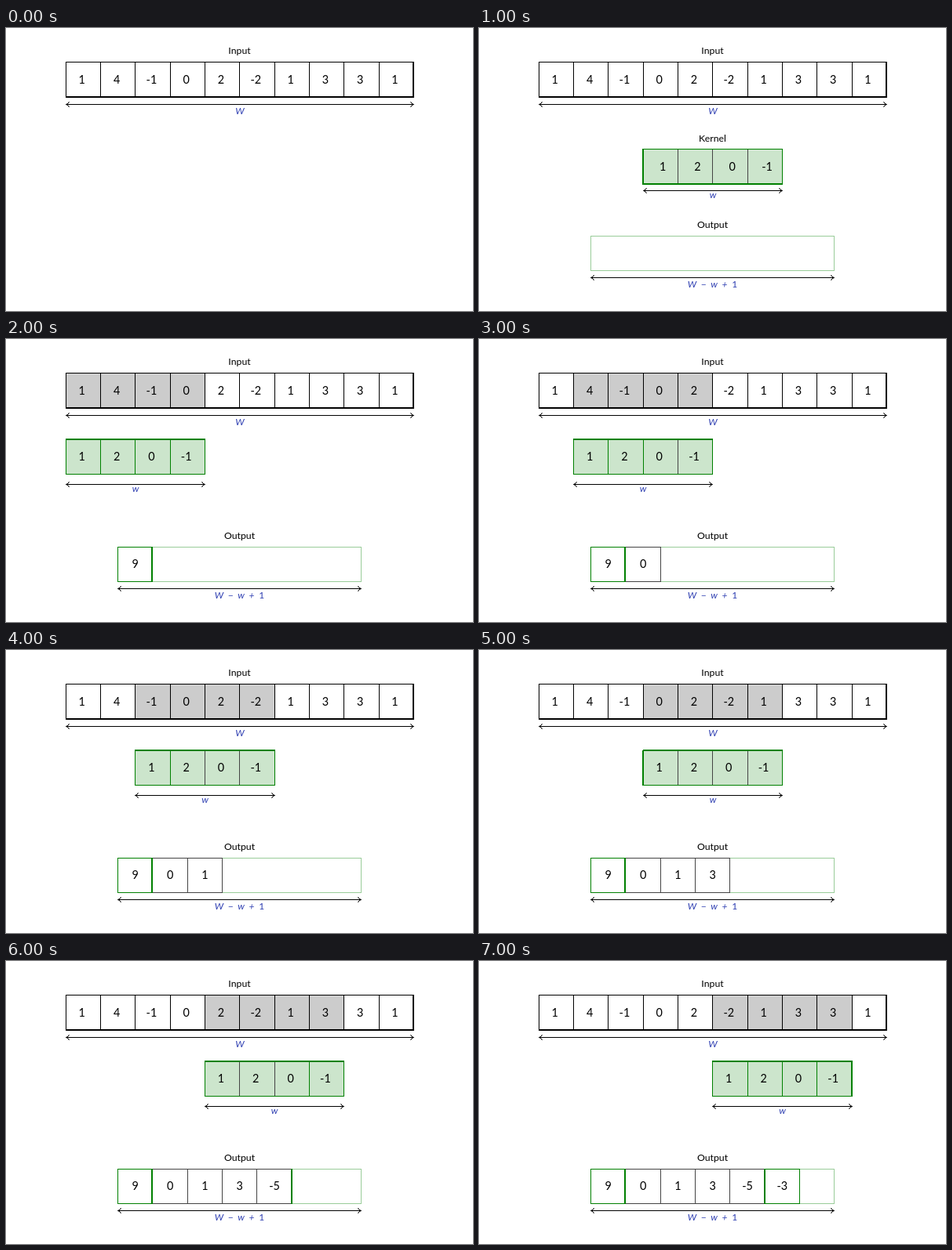
An HTML page that plays this animation: 595x361 px, repeating every 8 s.

```html
<!DOCTYPE html>
<html lang="en">
<head>
<meta charset="utf-8">
<title>1D convolution</title>
<style>
  html, body { margin: 0; width: 100%; height: 100%; overflow: hidden; background: #fff; }
  svg { display: block; font-family: Lato, "Open Sans", sans-serif; text-anchor: middle; }
  rect { shape-rendering: crispEdges; }
  .digit { font-size: 14.4px; }
  .label { font-size: 12.3px; }
  .math { font-size: 12px; font-style: italic; fill: #3040b2; word-spacing: 3px; }
  .math tspan { font-style: normal; }
  .arrow { fill: none; stroke: #000; }
</style>
</head>
<body>
<svg id="stage" width="595" height="361" viewBox="0 0 595 361"></svg>
<script>
const input = [1, 4, -1, 0, 2, -2, 1, 3, 3, 1];
const kernel = [1, 2, 0, -1];
const output = input.slice(0, 6).map((_, i) =>
  kernel.reduce((sum, k, j) => sum + k * input[i + j], 0));

const CELL = 44.3, STEP_MS = 1000, STEPS = 8;
const GREEN = '#008000', DARK = '#444';
const stage = document.getElementById('stage');

const gridX = i => Math.floor(76.3 + CELL * i);
const outX = i => Math.floor(142.5 + CELL * i);
const isMiddle = x => x > 230 && x < 345;

const rect = (x, y, w, h, fill) =>
  `<rect x="${x}" y="${y}" width="${w}" height="${h}" fill="${fill}"/>`;
const text = (x, y, value, cls) => `<text x="${x}" y="${y}" class="${cls}">${value}</text>`;
const digits = (values, x, y) =>
  values.map((v, i) => text(x + CELL * i, y, v, 'digit')).join('');

// Horizontal or vertical line that ends on the given pixel.
const hLine = (x1, x2, y, color, w = 1) => rect(x1, y - w + 1, x2 - x1 + 1, w, color);
const vLine = (x, y1, y2, color, w = 1) => rect(x - w + 1, y1, w, y2 - y1 + 1, color);

function measure(x1, x2, y, value, textY) {
  const a = x1 + .5, b = x2 + .5, c = y + .5;
  return `<path class="arrow" d="M${a} ${c}H${b}
    M${a + 4} ${c - 3.5}q-1 2.9-4 3.5q3 .6 4 3.5
    M${b - 4} ${c - 3.5}q1 2.9 4 3.5q-3 .6-4 3.5"/>`
    + text((a + b) / 2, textY, value, 'math');
}

function drawInput(shift) {
  const left = gridX(0), right = gridX(10);
  let s = shift < 0 ? '' : rect(gridX(shift), 43, gridX(shift + 4) - gridX(shift), 45, '#ccc');
  for (let i = 0; i < 10; i++) s += vLine(gridX(i), 43, 88, '#000');
  return s + vLine(right, 43, 88, '#000', 2)
    + hLine(left, right, 43, '#000') + hLine(left, right, 88, '#000', 2)
    + digits(input, 96.8, 71) + text(297.5, 33, 'Input', 'label')
    + measure(left, right, 97, 'W', 110);
}

function drawKernel(shift) {
  const resting = shift < 0, first = resting ? 3 : shift;
  const top = resting ? 154 : 128, bottom = resting ? 199 : 172;
  const left = gridX(first), right = gridX(first + 4);
  const edge = i => vLine(gridX(i), top, bottom, GREEN, i === 3 || i === 9 ? 2 : 1);
  let s = rect(left, top, right - left, bottom - top, '#cce5cc');
  for (let i = 1; i < 4; i++) {
    const x = gridX(first + i);
    s += vLine(x, top, bottom, isMiddle(x) && shift < 5 ? DARK : GREEN);
  }
  s += edge(first) + edge(first + 4)
    + hLine(left, right, top, GREEN, resting ? 1 : 2)
    + hLine(left, right, bottom, GREEN, resting ? 2 : 1);
  return s + digits(kernel, 76.3 + CELL * first + (resting ? 25 : 20.5), resting ? 182 : 155)
    + (resting ? text(297.5, 145, 'Kernel', 'label') : '')
    + measure(left, right, resting ? 207 : 185, 'w', resting ? 217 : 195);
}

function drawOutput(count) {
  const left = outX(0), right = outX(7), pale = '#99cc99';
  let s = hLine(left, right, 265, pale) + hLine(left, right, 309, pale)
    + vLine(left, 265, 309, pale) + vLine(right, 265, 309, pale);
  for (let i = 0; i < count; i++) {
    const a = outX(i), b = outX(i + 1);
    const color = i === 0 || i === 5 ? GREEN : DARK;
    s += hLine(a, b, 265, color) + hLine(a, b, 309, color);
  }
  for (let i = 0; count && i <= count; i++)
    s += vLine(outX(i), 265, 309, i > 1 && i < 5 ? DARK : GREEN, i === 1 || i === 5 ? 2 : 1);
  return s + digits(output.slice(0, count), 164.8, 292)
    + text(297.5, 255, 'Output', 'label')
    + measure(left, right, 318, 'W − w + <tspan>1</tspan>', 331);
}

let shown = -1;
function frame(now) {
  const step = Math.floor(now / STEP_MS) % STEPS;
  if (step !== shown) {
    shown = step;
    const shift = step - 2;
    stage.innerHTML = drawInput(shift)
      + (step ? drawKernel(shift) + drawOutput(shift + 1) : '');
  }
  requestAnimationFrame(frame);
}
frame(performance.now());
</script>
</body>
</html>
```
